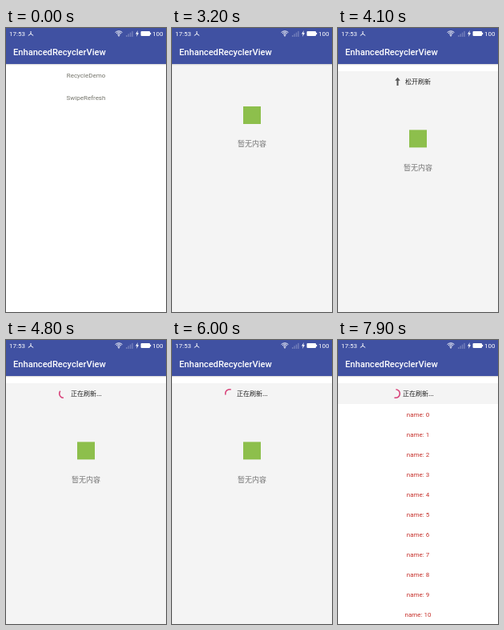
These frames come from a looping animation (200x355 px, 8000 ms). An HTML page with a canvas:

```html
<!DOCTYPE html>
<html lang="zh">
<head>
<meta charset="utf-8">
<title>EnhancedRecyclerView</title>
<style>
html, body { margin: 0; width: 100%; height: 100%; overflow: hidden; background: #fff; }
canvas { display: block; width: 200px; height: 355px; }
</style>
</head>
<body>
<canvas id="stage"></canvas>
<script>
const W = 200, H = 355, LOOP = 8000;
const BAR = 45, TOP = 54, HEAD = 26, ROW = 25;
const BLUE = '#4051a2', GREY = '#f4f4f4', PINK = '#d8437a';
const LATIN = 'Roboto, sans-serif';
const CJK = '"Noto Sans CJK SC", "Noto Sans CJK", sans-serif';

const canvas = document.getElementById('stage');
const c = canvas.getContext('2d');
const dpr = window.devicePixelRatio || 1;
canvas.width = W * dpr;
canvas.height = H * dpr;

const clamp = x => Math.max(0, Math.min(1, x));
const smooth = x => x * x * (3 - 2 * x);

// time, pull distance
const PULL = [[3200, 0], [4000, 26], [4100, 26], [4500, 34], [4600, 34], [4800, 26],
  [6300, 26], [6600, 0], [6800, 0], [7300, 34], [7400, 34], [7600, 26], [LOOP, 26]];

// refresh start, end, first spinner angle in degrees
const REFRESH = [[4600, 6700, 82], [7400, LOOP, 190]];

function pullAt(t) {
  for (let i = 1; i < PULL.length; i++) {
    const [t0, a] = PULL[i - 1], [t1, b] = PULL[i];
    if (t < t1) return a + (b - a) * smooth(clamp((t - t0) / (t1 - t0)));
  }
  return 0;
}

function box(x, y, w, h, color) {
  c.fillStyle = color;
  c.fillRect(x, y, w, h);
}

function text(str, x, y, size, color, { family = LATIN, weight = 400, align = 'left' } = {}) {
  c.font = `${weight} ${size}px ${family}`;
  c.textAlign = align;
  c.textBaseline = 'alphabetic';
  c.fillStyle = color;
  c.fillText(str, x, y + size * 0.36);
}

function poly(points, color) {
  c.beginPath();
  points.forEach(([x, y]) => c.lineTo(x, y));
  c.closePath();
  c.fillStyle = color;
  c.fill();
}

function statusBar() {
  text('17:53', 4, 7, 8, '#fff');

  c.strokeStyle = '#fff';
  c.lineWidth = 1;
  c.beginPath();
  for (const [x, y] of [[31, 4], [27.8, 9.5], [34.2, 9.5]]) {
    c.moveTo(31, 7.3);
    c.lineTo(x, y);
  }
  c.stroke();

  for (const r of [2.4, 4.3, 6.2]) {
    c.beginPath();
    c.arc(141, 10, r, -Math.PI * 0.75, -Math.PI * 0.25);
    c.stroke();
  }
  c.beginPath();
  c.arc(141, 9.6, 0.9, 0, Math.PI * 2);
  c.fillStyle = '#fff';
  c.fill();

  for (let i = 0; i < 4; i++) {
    box(150 + i * 2.4, 9 - i * 1.7, 1.5, 2 + i * 1.7, 'rgba(255,255,255,.25)');
  }
  poly([[164.8, 3], [162, 7.6], [163.8, 7.6], [163, 11], [166, 6.3], [164.2, 6.3]], '#fff');

  c.fillStyle = '#fff';
  c.beginPath();
  c.roundRect(168.5, 4, 11.5, 6, 1);
  c.fill();
  box(180, 5.8, 1.2, 2.4, '#fff');
  text('100', 183, 7, 8, '#fff');
}

function appBar() {
  const g = c.createLinearGradient(0, BAR, 0, BAR + 2);
  g.addColorStop(0, 'rgba(0,0,0,.16)');
  g.addColorStop(1, 'rgba(0,0,0,0)');
  box(0, BAR, W, 2, g);
  box(0, 0, W, BAR, BLUE);
  text('EnhancedRecyclerView', 9, 30, 11.11, '#fff', { weight: 500 });
}

function menu() {
  box(0, 0, W, H, '#fff');
  ['RecycleDemo', 'SwipeRefresh'].forEach((label, i) =>
    text(label, 100, 59 + i * 28, 8, '#75756c', { align: 'center' }));
  appBar();
}

function arrow(x, y, turn) {
  c.save();
  c.translate(x, y);
  c.rotate(Math.PI * (1 + turn));
  box(-1, -2.5, 2, 7.5, '#555');
  poly([[0, -5.2], [3.2, -1.2], [-3.2, -1.2]], '#555');
  c.restore();
}

function spinner(x, y, u, first) {
  const rad = Math.PI / 180;
  const mid = (first + 0.36 * u) * rad;
  const half = (16 + 94 * Math.sin(Math.PI * u / 800) ** 2) * rad;
  c.beginPath();
  c.arc(x, y, 5.3, mid - half, mid + half);
  c.strokeStyle = PINK;
  c.lineWidth = 1.6;
  c.stroke();
}

function pullHeader(t, off) {
  const y = TOP + off - HEAD / 2;
  const label = (str, x) => text(str, x, y, 8, '#222', { family: CJK, weight: 500 });
  const busy = REFRESH.find(([a, b]) => t >= a && t < b);
  if (busy) {
    spinner(72, y, t - busy[0], busy[2]);
    label('正在刷新...', 81);
  } else {
    const turn = clamp((off - 19) / 5);
    arrow(74.5, y, turn);
    label(turn > 0.5 ? '松开刷新' : '下拉刷新', 84);
  }
}

function emptyView(off) {
  const dy = off * 1.13;
  box(89, 98 + dy, 22, 22, '#8dbf4c');
  text('暂无内容', 100, 145 + dy, 9, '#757575', { family: CJK, align: 'center' });
}

function rows(off) {
  const y = TOP + off;
  box(0, y, W, H - y, '#fff');
  for (let i = 0; y + i * ROW < H; i++) {
    text('name: ' + i, 100, y + 13 + i * ROW, 8, '#c6302a', { align: 'center' });
  }
}

function list(t) {
  const off = pullAt(t);
  box(0, 0, W, H, GREY);
  if (off > 0.5) box(0, BAR, W, TOP - BAR, '#fff');
  c.save();
  c.beginPath();
  c.rect(0, TOP, W, H - TOP);
  c.clip();
  if (off > 0.5) pullHeader(t, off);
  if (t < 6300) emptyView(off);
  else rows(off);
  c.restore();
  appBar();
}

function shifted(x, paint) {
  c.save();
  c.translate(x, 0);
  paint();
  c.restore();
}

function draw(t) {
  c.setTransform(dpr, 0, 0, dpr, 0, 0);
  const open = 1 - (1 - clamp((t - 2200) / 500)) ** 3;
  if (open < 1) shifted(-W * 0.3 * open, menu);
  if (open > 0) shifted(W * (1 - open), () => list(t));
  box(0, 0, W, 14, BLUE);
  statusBar();
}

const start = performance.now();
function tick() {
  draw((performance.now() - start) % LOOP);
  requestAnimationFrame(tick);
}
tick();
</script>
</body>
</html>
```
